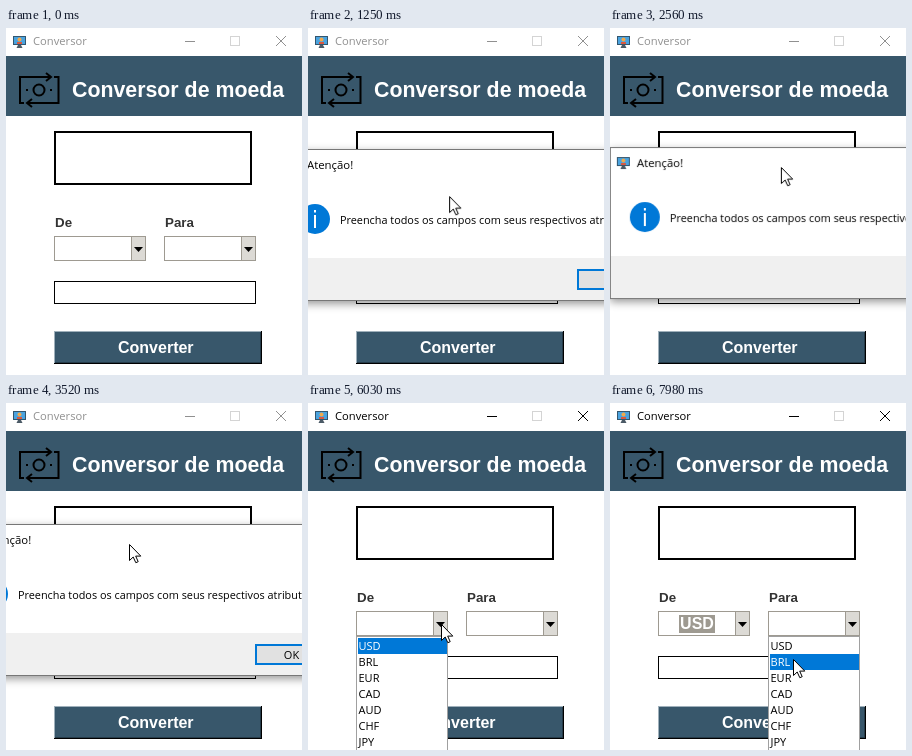
Write an HTML page that moves like this. It is 296 px wide and 347 px high and loops after 8000 ms.

```html
<!DOCTYPE html>
<html lang="pt">
<head>
<meta charset="utf-8">
<title>Conversor</title>
<style>
html, body { margin: 0; width: 100%; height: 100%; overflow: hidden; background: #fff; }
svg { display: block; width: 296px; height: 347px; }
rect { shape-rendering: crispEdges; }
.ui { font: 11px "Open Sans", "Noto Sans", sans-serif; }
.bold { font-family: "Liberation Sans", Arial, sans-serif; font-weight: bold; }
.line { fill: none; stroke: currentColor; }

.bar, .dialog, .drag, .cursor, .sunken, .from, .to, .usd, .value, .mark, .hover {
  animation: 8s linear infinite;
}
.bar { animation-name: bar; animation-timing-function: step-end; }
.sunken { animation-name: sunken; animation-timing-function: step-end; }
.from { animation-name: from; animation-timing-function: step-end; }
.to { animation-name: to; animation-timing-function: step-end; }
.usd { animation-name: usd; animation-timing-function: step-end; }
.value { animation-name: value; animation-timing-function: step-end; }
.mark { animation-name: mark; animation-timing-function: step-end; }
.hover { animation-name: hover; animation-timing-function: step-end; }
.dialog { animation-name: fade; }
.drag { animation-name: drag; filter: drop-shadow(0 3px 4px rgba(0, 0, 0, .4)); }
.cursor { animation-name: cursor; }

@keyframes bar {
  0%, 10.4% { color: #909090; }
  9.4%, 64.1%, 100% { color: #000; }
}
@keyframes sunken {
  0%, 10.4%, 100% { opacity: 0; }
  9.4% { opacity: 1; }
}
@keyframes fade {
  0%, 10.4% { opacity: 0; }
  11.4%, 64.1% { opacity: 1; }
  66.3%, 100% { opacity: 0; }
}
@keyframes drag {
  0%, 18.75% { transform: translate(-28px, 121px); animation-timing-function: ease-in-out; }
  22.6%, 25.9% { transform: translate(45px, 117px); animation-timing-function: ease-in; }
  32% { transform: translate(0, 119px); animation-timing-function: ease-out; }
  39.9%, 44% { transform: translate(-48px, 121px); animation-timing-function: ease-in-out; }
  52.75%, 100% { transform: translate(-92px, 124px); }
}
@keyframes cursor {
  0%, 2.6% { transform: translate(300px, 326px); animation-timing-function: ease-out; }
  8.75% { transform: translate(170px, 314px); }
  12.1% { transform: translate(158px, 307px); }
  15.6% { transform: translate(141px, 169px); animation-timing-function: ease-out; }
  17.5%, 18.75% { transform: translate(143px, 141px); animation-timing-function: ease-in-out; }
  22.6%, 25.9% { transform: translate(216px, 137px); animation-timing-function: ease-in; }
  32% { transform: translate(171px, 139px); animation-timing-function: ease-out; }
  39.9%, 44% { transform: translate(123px, 141px); animation-timing-function: ease-in-out; }
  52.75%, 54.4% { transform: translate(79px, 144px); animation-timing-function: ease-in; }
  58.9% { transform: translate(191px, 259px); animation-timing-function: ease-out; }
  61.25%, 65% { transform: translate(238px, 260px); animation-timing-function: ease-in-out; }
  73.5%, 75.4% { transform: translate(133px, 221px); animation-timing-function: ease-in-out; }
  79.4%, 81.25% { transform: translate(100px, 240px); animation-timing-function: ease-in; }
  84.9% { transform: translate(161px, 226px); animation-timing-function: ease-out; }
  90%, 91.9% { transform: translate(242px, 221px); animation-timing-function: ease-in-out; }
  95.4%, 96.25% { transform: translate(205px, 241px); animation-timing-function: ease-out; }
  99.7%, 100% { transform: translate(183px, 256px); }
}
@keyframes from {
  0%, 81.25%, 100% { visibility: hidden; }
  75.37% { visibility: visible; }
}
@keyframes to {
  0% { visibility: hidden; }
  91.9%, 100% { visibility: visible; }
}
@keyframes usd {
  0% { visibility: hidden; }
  81.25%, 100% { visibility: visible; }
}
@keyframes value {
  0% { fill: #4a6984; }
  91.9%, 100% { fill: #9e9a91; }
}
@keyframes mark {
  0% { transform: none; }
  98%, 100% { transform: translateY(16px); }
}
@keyframes hover {
  0%, 66.5%, 100% { fill: #e1e1e1; }
  59.8% { fill: #e5f1fb; }
}
</style>
</head>
<body>
<svg viewBox="0 0 296 347">
  <defs>
    <g id="app">
      <rect y="1" width="13" height="9" fill="#33566e"/>
      <rect x="1" y="2" width="11" height="7" fill="#4aa3df"/>
      <circle cx="6.5" cy="4.5" r="2" fill="#f0a94c"/>
      <rect x="4" y="7" width="5" height="2" fill="#d9573f"/>
      <path d="M5 10h3l1.5 3h-6z" fill="#4b5a66"/>
    </g>
    <g id="combo">
      <rect x="48.5" y="208.5" width="91" height="24" rx="1" fill="#fff" stroke="#9e9a91"/>
      <rect x="126" y="209" width="13" height="23" fill="#dcdad5"/>
      <rect x="125" y="209" width="1" height="23" fill="#9e9a91"/>
      <path d="M128 219h9l-4.5 5z"/>
    </g>
    <g id="list" class="ui">
      <rect x="48.5" y="233.5" width="91" height="120" fill="#fff" stroke="#a0a0a0"/>
      <g id="codes"></g>
    </g>
    <clipPath id="row"><rect class="mark" x="50" y="235" width="89" height="16"/></clipPath>
    <clipPath id="first"><rect x="50" y="235" width="89" height="16"/></clipPath>
  </defs>

  <rect width="296" height="347" fill="#fff"/>

  <g class="bar">
    <use href="#app" x="7" y="7"/>
    <text class="ui" x="27" y="17" style="font-size:11.2px" fill="currentColor">Conversor</text>
    <path class="line" d="M179 13.5h10M270 8l10 10m0-10l-10 10"/>
    <rect x="224.5" y="8.5" width="9" height="9" fill="none" stroke="#d4d4d4"/>
  </g>

  <rect y="28" width="296" height="60" fill="#38576b"/>
  <g fill="none" stroke="#000" stroke-width="2">
    <path d="M18 75H14V49H45M40 45l5 4-5 4M48 49h4.500V75H21M26 71l-5 4 5 4"/>
    <circle cx="33" cy="62" r="5.500"/>
    <path d="M20 62h2M44 62h2"/>
  </g>
  <text class="bold" x="66" y="69" font-size="21.33" fill="#fff">Conversor de moeda</text>

  <rect x="49" y="104" width="196" height="52" fill="#fff" stroke="#000" stroke-width="2"/>
  <g class="bold" font-size="13.33" fill="#333">
    <text x="49" y="199">De</text>
    <text x="159" y="199">Para</text>
  </g>
  <use href="#combo"/>
  <use href="#combo" x="110"/>
  <g class="usd">
    <rect class="value" x="69" y="212" width="36" height="18"/>
    <text class="bold" x="87" y="226" font-size="16" fill="#fff" text-anchor="middle">USD</text>
  </g>
  <rect x="48.5" y="253.5" width="201" height="22" fill="#fff" stroke="#000"/>

  <rect x="48" y="303" width="208" height="33" fill="#000"/>
  <rect x="48" y="303" width="207" height="32" fill="#9fb0bb"/>
  <rect x="49" y="304" width="206" height="31" fill="#263c4a"/>
  <rect x="49" y="304" width="205" height="30" fill="#38576b"/>
  <path class="sunken" d="M48.500 336V303.500H256" fill="none" stroke="#000"/>
  <text class="bold" x="112" y="325" font-size="16" fill="#fff">Converter</text>

  <g class="from">
    <use href="#list"/>
    <g clip-path="url(#first)">
      <rect x="50" y="235" width="89" height="16" fill="#0078d7"/>
      <use href="#codes" class="ui" fill="#fff"/>
    </g>
  </g>
  <g class="to" transform="translate(110)">
    <use href="#list"/>
    <g clip-path="url(#row)">
      <rect x="50" y="235" width="89" height="112" fill="#0078d7"/>
      <use href="#codes" class="ui" fill="#fff"/>
    </g>
  </g>

  <g class="dialog">
    <g class="drag">
      <rect x=".5" y=".5" width="387" height="151" fill="#fff" stroke="#777"/>
      <rect x="1" y="109" width="386" height="42" fill="#f0f0f0"/>
      <use href="#app" x="7" y="9"/>
      <text class="ui" x="27" y="20" style="font-size:11.4px">Atenção!</text>
      <path d="M366.500 10.500l9 9m0-9l-9 9" stroke="#000"/>
      <circle cx="35" cy="70" r="15" fill="#0078d7"/>
      <path d="M35 66v13M35 61v2.500" stroke="#fff" stroke-width="2"/>
      <text class="ui" x="60" y="75" style="font-size:10.87px">Preencha todos os campos com seus respectivos atributos</text>
      <rect class="hover" x="298" y="121" width="71" height="19" fill="#e1e1e1" stroke="#0078d7" stroke-width="2"/>
      <text class="ui" x="333.500" y="135" text-anchor="middle">OK</text>
    </g>
  </g>

  <path class="cursor" d="M.5 .5V16.500L4.200 13 6.800 18.700 9.200 17.700 6.700 12.100H11.800Z" fill="#fff" stroke="#000"/>
</svg>
<script>
const codes = ["USD", "BRL", "EUR", "CAD", "AUD", "CHF", "JPY"];
const group = document.getElementById("codes");
codes.forEach((code, i) => {
  const text = document.createElementNS("http://www.w3.org/2000/svg", "text");
  text.setAttribute("x", 50.5);
  text.setAttribute("y", 247 + 16 * i);
  text.textContent = code;
  group.append(text);
});
</script>
</body>
</html>
```
